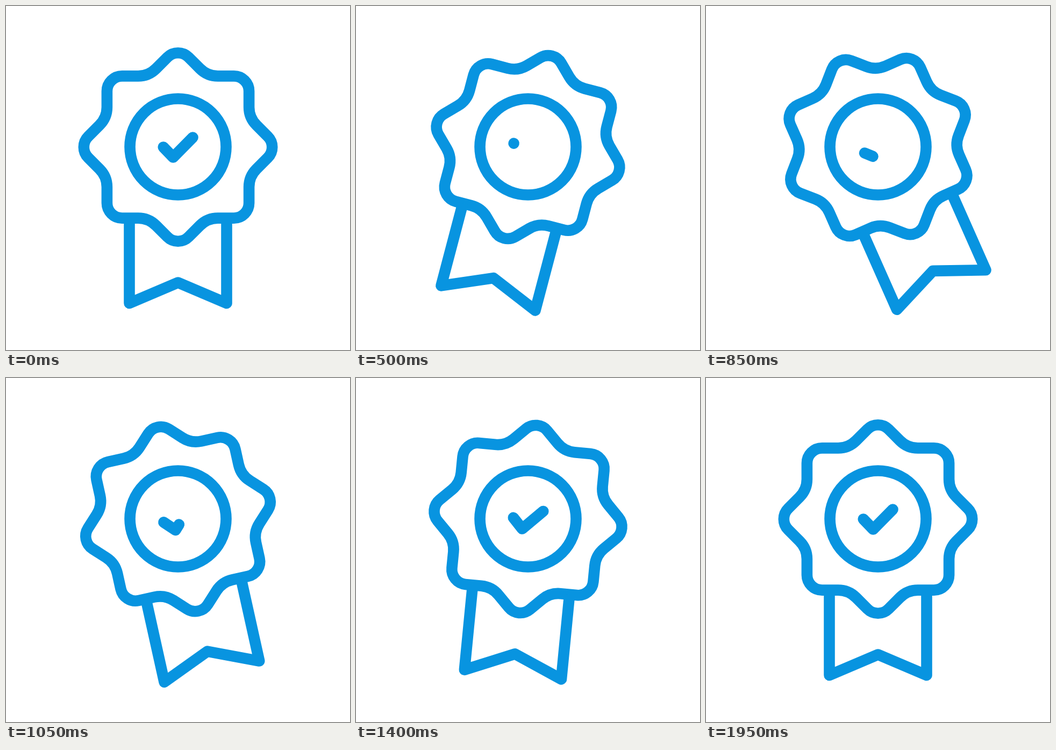
These frames come from a looping animation (640x640 px, 2 s). An HTML page with a canvas:

```html
<!DOCTYPE html>
<html>
<head>
<meta charset="utf-8">
<style>
html, body { margin: 0; height: 100%; overflow: hidden; background: #fff; }
canvas { display: block; width: 640px; height: 640px; }
</style>
</head>
<body>
<canvas id="stage" width="640" height="640"></canvas>
<script>
const ctx = document.getElementById('stage').getContext('2d');
const LOOP = 2000, STEP = 50;
const CX = 320, CY = 262.5, APOTHEM = 132.1;

// [time, value] keys, eased from each to the next
const SWING = [[110, 0], [531, 15], [858, -24], [1323, 7], [1657, -3.7], [1950, 0]];

const clamp = u => Math.min(1, Math.max(0, u));
const smooth = u => u * u * (3 - 2 * u);

function swingAt(t) {
  let value = 0;
  for (let i = 1; i < SWING.length; i++) {
    const [t0, a] = SWING[i - 1], [t1, b] = SWING[i];
    if (t >= t0) value = a + (b - a) * smooth(clamp((t - t0) / (t1 - t0)));
  }
  return value;
}

// The tick is wiped back to a dot, then drawn again
function tickAt(t) {
  return t < 300 ? 1 - smooth(t / 300) : clamp((t - 700) / 710);
}

// Eight right-angled lobes with rounded tips and valleys
function rosettePath() {
  const path = new Path2D();
  const tip = APOTHEM * Math.SQRT2, valley = APOTHEM / Math.cos(Math.PI / 8);
  const corner = i => {
    const r = i % 2 ? valley : tip, a = i * Math.PI / 8;
    return [r * Math.sin(a), -r * Math.cos(a)];
  };
  const [x0, y0] = corner(0), [x1, y1] = corner(1);
  path.moveTo((x0 + x1) / 2, (y0 + y1) / 2);
  for (let i = 1; i <= 16; i++) {
    path.arcTo(...corner(i), ...corner(i + 1), i % 2 ? 47 : 28);
  }
  path.closePath();
  return path;
}

const rosette = rosettePath();
const ribbon = new Path2D('M-90.5 132V290.5L0 252L90.5 290.5V132');
const tick = new Path2D('M-27.3 0L-9 19L27.5 -18');
const TICK_LENGTH = Math.hypot(18.3, 19) + Math.hypot(36.5, 37);
const ring = new Path2D();
ring.arc(0, -0.5, 89.5, 0, 2 * Math.PI);

function draw(t) {
  ctx.clearRect(0, 0, 640, 640);
  ctx.strokeStyle = '#0894e0';
  ctx.lineWidth = 20.6;
  ctx.lineJoin = 'round';
  ctx.save();
  ctx.translate(CX, CY);
  ctx.stroke(ring);
  ctx.rotate(swingAt(t) * Math.PI / 180);
  ctx.stroke(rosette);
  ctx.lineCap = 'butt';
  ctx.stroke(ribbon);
  ctx.lineCap = 'round';
  ctx.setLineDash([TICK_LENGTH * tickAt(t) + 0.01, 999]);
  ctx.stroke(tick);
  ctx.restore();
}

const start = performance.now();
function frame() {
  const t = (performance.now() - start) % LOOP;
  draw(Math.floor(t / STEP) * STEP);
  requestAnimationFrame(frame);
}
frame();
</script>
</body>
</html>
```
